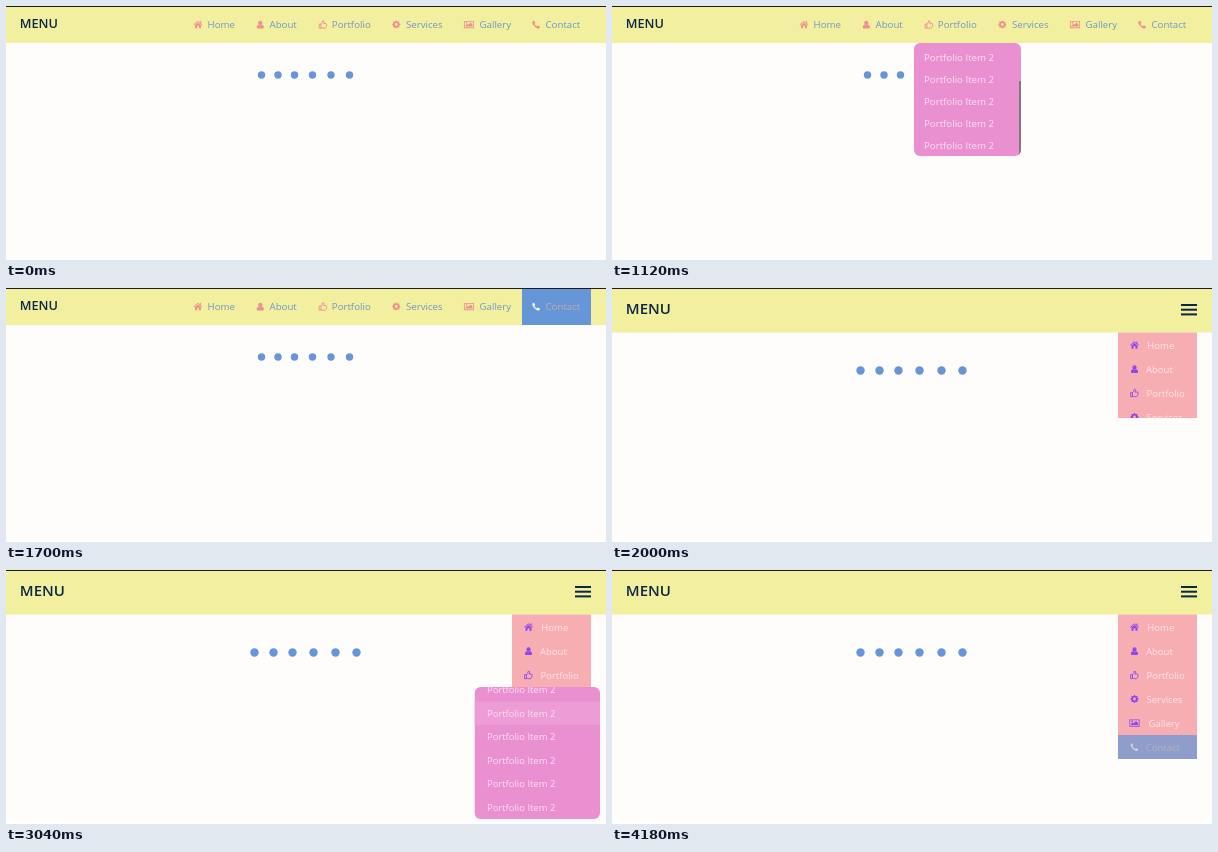
Write an HTML page with a canvas that moves like this. It is 600x254 px and loops after 4.2 s.

```html
<!DOCTYPE html>
<html lang="en">
<head>
<meta charset="utf-8">
<title>Responsive menu</title>
<style>
  html, body { margin: 0; width: 100%; height: 100%; overflow: hidden; background: #fffdfc; }
  canvas { display: block; }
</style>
</head>
<body>
<canvas id="stage" width="600" height="254"></canvas>
<script>
const ctx = document.getElementById('stage').getContext('2d');
const LOOP = 4200, SWITCH = 1860, FADE = 110;
const NAVY = '#0c2744', BLUE = '#6496d8', FONT = '"Open Sans", sans-serif';

const gear = new Path2D();
for (let i = 0; i < 32; i++) {
  const a = (i - 0.5) * Math.PI / 16, r = i % 4 < 2 ? 4.4 : 3.5;
  gear.lineTo(5 + r * Math.cos(a), 5 + r * Math.sin(a));
}
gear.closePath();
gear.moveTo(6.5, 5);
gear.arc(5, 5, 1.5, 0, Math.PI * 2, true);

const icons = {
  home: new Path2D('M5 .8 9.8 5 9.2 5.7 5 2.1 .8 5.7 .2 5ZM1.7 5.7 5 2.9 8.3 5.7V9H6V6.3H4V9H1.7ZM7.2 1.3H8.4V3.7L7.2 2.6Z'),
  user: new Path2D('M5 .8a2.3 2.5 0 1 1 0 5 2.3 2.5 0 1 1 0-5ZM3 5.2Q5 7 7 5.2 8.9 5.6 8.9 8 8.9 9.3 7.7 9.3H2.3Q1.1 9.3 1.1 8 1.1 5.6 3 5.2Z'),
  thumb: new Path2D('M.8 4.6H2.8V9H.8ZM2.8 4.7Q4.4 3.8 4.7 1 6.3 .6 6.2 2.4L5.8 4H8.2Q9.4 4.2 8.9 5.3 9.2 6.2 8.6 6.8 8.7 7.7 8 8.1 7.9 9 7 9H5Q4 9 2.8 8.5'),
  gear,
  image: new Path2D('M-.5 1.2H10.5V9H-.5ZM.4 2.1V8.1H9.6V2.1ZM1.2 7.3V6L3.1 4.2 4.2 5.2 6.7 2.9 8.8 5V7.3ZM1.5 3.2a.9 .9 0 1 1 1.8 0 .9 .9 0 1 1-1.8 0Z'),
  phone: new Path2D('M1 1.6Q1.9 .7 2.8 1L4 3.3 3 4.4Q4 6.1 5.6 7L6.7 6 9 7.2Q9.3 8.2 8.4 9 7.3 9.6 5.8 9 2.4 7.4 1 4.2 .4 2.7 1 1.6Z')
};

// wide: [left, right, icon, label]; hover: [enter, leave] for each layout
const items = [
  { text: 'Home', icon: 'home', wide: [177, 240, 192, 201.5], label: 535.3, hover: [[280, 540], [2290, 2310]] },
  { text: 'About', icon: 'user', wide: [240, 302, 254.3, 263.5], label: 534, hover: [[536, 680], [2300, 2500]] },
  { text: 'Portfolio', icon: 'thumb', wide: [302, 376, 317, 325.8], label: 534.5, hover: [[680, 900], [2500, 2720]] },
  { text: 'Services', icon: 'gear', wide: [376, 447, 390.3, 400], label: 534.5, hover: [[1210, 1320], [3300, 3500]] },
  { text: 'Gallery', icon: 'image', wide: [447, 516, 463, 473.5], label: 536.5, hover: [[1320, 1440], [3500, 3700]] },
  { text: 'Contact', icon: 'phone', wide: [516, 585, 530.2, 539.5], label: 533.8, hover: [[1440, 1720], [3700, 4148]] }
];

const ramp = (t, start, length) => Math.max(0, Math.min(1, (t - start) / length));
const ease = p => p * p * (3 - 2 * p);
const during = (t, [enter, leave], length = FADE) => ramp(t, enter, length) * (1 - ramp(t, leave, length));

function rect(x, y, w, h, color) {
  ctx.fillStyle = color;
  ctx.fillRect(x, y, w, h);
}

function write(text, x, y, size, color, weight = 400) {
  ctx.font = `${weight} ${size}px ${FONT}`;
  ctx.fillStyle = color;
  ctx.fillText(text, x, y);
}

function drawIcon(name, x, y, color) {
  ctx.save();
  ctx.translate(x - 4.6, y - 4.6);
  ctx.scale(0.92, 0.92);
  ctx.fillStyle = ctx.strokeStyle = color;
  if (name === 'thumb') ctx.stroke(icons[name]);
  else ctx.fill(icons[name]);
  ctx.restore();
}

function drawItem(item, box, iconX, labelX, size, colors, hover) {
  const [x, y, w, h] = box, mid = y + h / 2;
  const content = ([iconColor, labelColor]) => {
    drawIcon(item.icon, iconX, mid, iconColor);
    write(item.text, labelX, mid + 3.5, size, labelColor);
  };
  content(colors);
  if (!hover) return;
  ctx.globalAlpha = hover;
  rect(x, y, w, h, BLUE);
  content(['#f6f2d2', '#cba9a2']);
  ctx.globalAlpha = 1;
}

function drawSocial(xs, y, r) {
  ctx.fillStyle = BLUE;
  for (const x of xs) {
    ctx.beginPath();
    ctx.arc(x, y, r, 0, Math.PI * 2);
    ctx.fill();
  }
}

function drawDropdown({ x, y, w, h, row, size, pad, alpha, scroll, pointer, bar }) {
  if (!alpha) return;
  const count = 8, offset = scroll * (count * row - h);
  ctx.save();
  ctx.globalAlpha = alpha;
  ctx.beginPath();
  ctx.roundRect(x, y, w, h, 6);
  ctx.clip();
  rect(x, y, w, h, '#ea90d0');
  for (let i = 0; i < count; i++) {
    const top = y + i * row - offset;
    if (pointer >= top && pointer < top + row) rect(x, top, w, row, '#ed9cd5');
    write('Portfolio Item 2', x + pad, top + row / 2 + 3.5, size, '#fae0f2');
  }
  if (bar) rect(x + w - 2, y + scroll * (h - 75), 2, 74, '#85777f');
  ctx.restore();
}

function drawWide(t) {
  rect(0, 0, 600, 37, '#f2f09f');
  write('MENU', 13.8, 22.3, 12.7, NAVY, 600);
  for (const item of items) {
    const [left, right, iconX, labelX] = item.wide;
    drawItem(item, [left, 0, right - left, 37], iconX, labelX, 9.7,
      ['#ef8f92', '#6f96c9'], during(t, item.hover[0]));
  }
  drawSocial([255.5, 272, 288.5, 306.5, 325, 343.5], 69, 3.7);
  drawDropdown({
    x: 302, y: 37, w: 107, h: 113, row: 22, size: 9.7, pad: 10,
    alpha: during(t, [740, 1160]), scroll: ease(ramp(t, 900, 140)), bar: t > 900
  });
}

function drawNarrow(t) {
  rect(0, 0, 600, 44.5, '#f2f09f');
  write('MENU', 13.8, 26, 15, NAVY, 600);
  for (let i = 0; i < 3; i++) rect(569, 16 + i * 4.7, 16, 2, NAVY);
  drawSocial([248.5, 267.5, 286.5, 307.5, 329.5, 350.5], 82.5, 4.2);

  ctx.save();
  ctx.beginPath();
  ctx.rect(506, 44.5, 79, 144.5 * ease(ramp(t, 1900, 180)));
  ctx.clip();
  rect(506, 44, 79, 145, '#f7aeb3');
  items.forEach((item, i) => drawItem(item, [506, 45 + i * 24, 79, 24], 522.5, item.label, 9.5,
    ['#9147ee', '#fde4e8'], during(t, item.hover[1])));
  ctx.restore();

  drawDropdown({
    x: 468.5, y: 117, w: 125.5, h: 132, row: 23.5, size: 9.45, pad: 12.5,
    alpha: during(t, [2600, 3220]), scroll: ease(ramp(t, 2840, 180)), pointer: t > 2740 ? 143 : -1
  });
}

function draw(now) {
  const t = now % LOOP;
  rect(0, 0, 600, 254, '#fffdfc');
  rect(0, 252, 600, 2, '#fff');
  (t < SWITCH ? drawWide : drawNarrow)(t);
  rect(0, 0, 600, 1, '#1c1c1c');
  requestAnimationFrame(draw);
}
requestAnimationFrame(draw);
</script>
</body>
</html>
```
